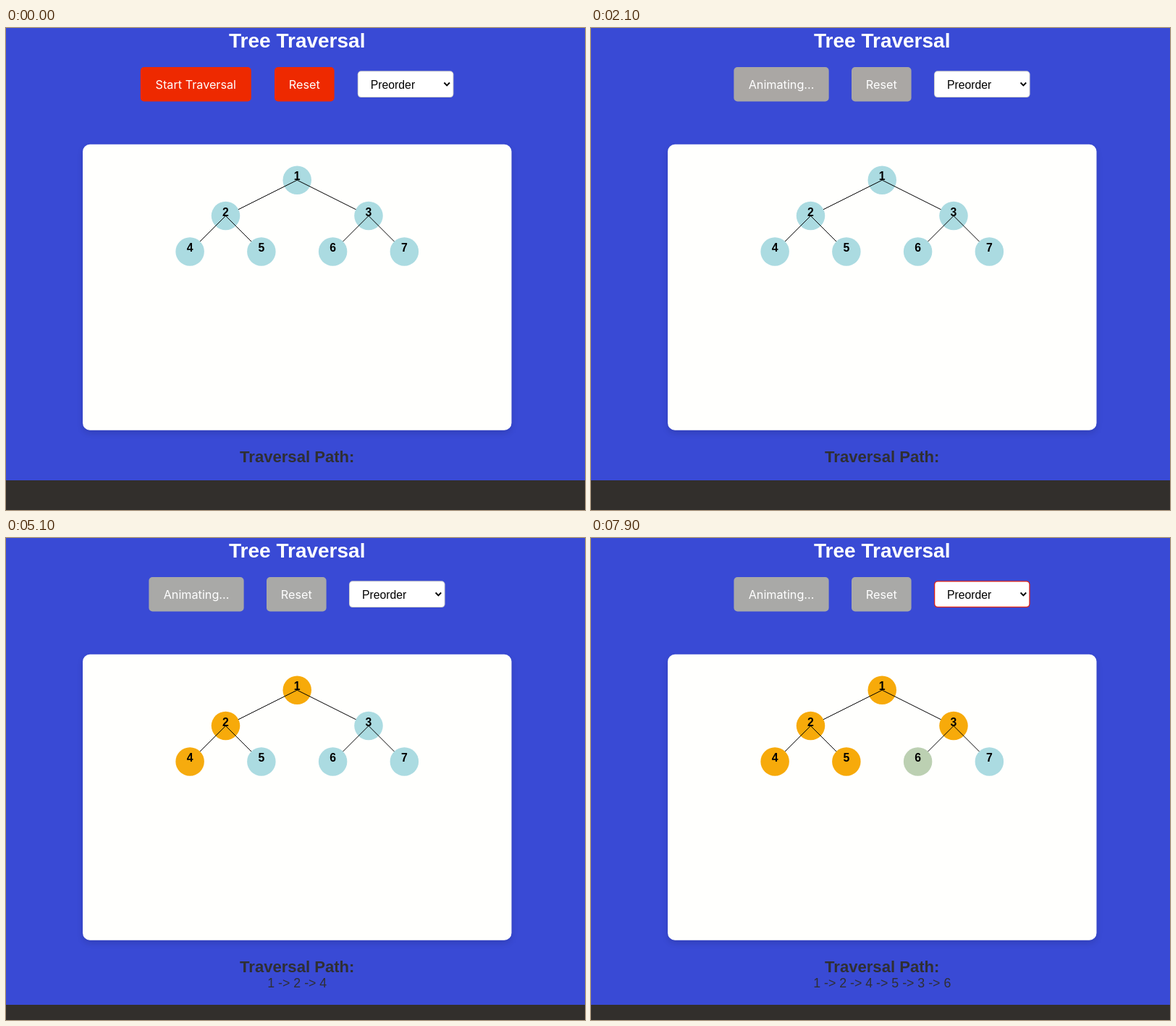
An HTML page with a canvas for the animation above (8 s loop, 800x666 px).

```html
<!DOCTYPE html>
<html lang="en">
<head>
<meta charset="utf-8">
<title>Tree Traversal</title>
<style>
  html, body { margin: 0; width: 100%; height: 100%; overflow: hidden; background: #394ad5; }
  canvas { display: block; }
</style>
</head>
<body>
<canvas id="stage" width="800" height="666"></canvas>
<script>
const ctx = document.getElementById('stage').getContext('2d');
const LOOP = 8000, STEP = 100;
const UNIT = 0.9875, CENTER = 402.25, PANEL_TOP = 160.8;
const SANS = '"Liberation Sans", Arial, sans-serif';
const BUTTON_FONT = '16.2px Inter, sans-serif';

const BLUE = [57, 74, 213], RED = [238, 41, 0], DARK_RED = [224, 36, 12];
const GRAY = [169, 169, 167], PALE = [171, 219, 225], ORANGE = [247, 170, 10];
const BORDER = [204, 204, 204], FOCUS = [222, 36, 22];

const HOVER_AT = 1350, CLICK_AT = 1850, VISIT_AT = 2850, SELECT_HOVER_AT = 6750;
const ORDER = [1, 2, 4, 5, 3, 6];

const rgb = c => `rgb(${c.map(Math.round).join()})`;
const mix = (a, b, k) => a.map((v, i) => v + (b[i] - v) * k);

// CSS "ease": cubic-bezier(.25, .1, .25, 1), solved by bisection
function ease(x) {
  if (x <= 0) return 0;
  if (x >= 1) return 1;
  const bez = (p1, p2, s) => 3 * p1 * s * (1 - s) ** 2 + 3 * p2 * s * s * (1 - s) + s ** 3;
  let lo = 0, hi = 1;
  for (let i = 0; i < 24; i++) {
    const mid = (lo + hi) / 2;
    if (bez(0.25, 0.25, mid) < x) lo = mid; else hi = mid;
  }
  return bez(0.1, 1, lo);
}
const transition = (t, start) => ease((t - start) / 300);

function text(str, x, y, font, color, align = 'center') {
  ctx.font = font;
  ctx.fillStyle = color;
  ctx.textAlign = align;
  ctx.fillText(str, x, y);
}

function roundRect(x, y, w, h, r, color) {
  ctx.beginPath();
  ctx.roundRect(x, y, w, h, r);
  ctx.fillStyle = color;
  ctx.fill();
}

function button(label, x, w, color, scale = 1) {
  const h = 47.4;
  ctx.save();
  ctx.translate(x + w / 2, 77.7);
  ctx.scale(scale, scale);
  roundRect(-w / 2, -h / 2, w, h, 5, rgb(color));
  text(label, 0, 5.9, BUTTON_FONT, '#fff');
  ctx.restore();
}

function select(x, hover) {
  roundRect(x, 59.3, 132.6, 36.8, 5, rgb(mix(BORDER, FOCUS, hover)));
  const edge = 1 + 0.3 * hover;
  roundRect(x + edge, 59.3 + edge, 132.6 - 2 * edge, 36.8 - 2 * edge, 4, '#fff');
  text('Preorder', x + 17.9, 83.6, `15.8px ${SANS}`, '#000', 'left');
  ctx.beginPath();
  ctx.moveTo(x + 119.6, 75.5);
  ctx.lineTo(x + 123.4, 79.3);
  ctx.lineTo(x + 127.2, 75.5);
  ctx.lineWidth = 1.9;
  ctx.strokeStyle = '#000';
  ctx.stroke();
}

function controls(t) {
  const running = t >= CLICK_AT;
  const hover = transition(t, HOVER_AT), off = transition(t, CLICK_AT);
  const scale = 1 + 0.05 * (running ? 1 - off : hover);
  const startColor = running ? mix(DARK_RED, GRAY, off) : mix(RED, DARK_RED, hover);
  if (running) button('Animating...', 197.4, 131.2, startColor, scale);
  else button('Start Traversal', 185.8, 153, startColor, scale);
  button('Reset', running ? 360 : 371, 82.6, mix(RED, GRAY, off));
  select(running ? 474 : 485.8, transition(t, SELECT_HOVER_AT));
}

function visitProgress(id, t) {
  const i = ORDER.indexOf(id);
  return i < 0 ? 0 : transition(t, VISIT_AT + i * 1000);
}

function node(id, x, y, spread, t) {
  ctx.beginPath();
  ctx.arc(x, y, 20 * UNIT, 0, Math.PI * 2);
  ctx.fillStyle = rgb(mix(PALE, ORANGE, visitProgress(id, t)));
  ctx.fill();
  text(id, x, y, `bold 15.8px ${SANS}`, '#000');
  if (id > 3) return;
  const childY = y + 50 * UNIT;
  for (const side of [0, 1]) {
    const childX = x + (side ? spread : -spread);
    ctx.beginPath();
    ctx.moveTo(x, y);
    ctx.lineTo(childX, childY);
    ctx.lineWidth = 1;
    ctx.strokeStyle = '#000';
    ctx.stroke();
    node(id * 2 + side, childX, childY, spread / 2, t);
  }
}

function panel() {
  ctx.save();
  ctx.shadowColor = 'rgba(0,0,0,.13)';
  ctx.shadowBlur = 8;
  ctx.shadowOffsetY = 4;
  roundRect(CENTER - 300 * UNIT, PANEL_TOP, 600 * UNIT, 400 * UNIT, 10, '#fffffd');
  ctx.restore();
}

function draw(t) {
  ctx.fillStyle = rgb(BLUE);
  ctx.fillRect(0, 0, 800, 666);
  text('Tree Traversal', CENTER, 27, `bold 28px ${SANS}`, '#fff');
  controls(t);
  panel();
  node(1, CENTER, PANEL_TOP + 50 * UNIT, 100 * UNIT, t);

  const visited = ORDER.filter((_, i) => t >= VISIT_AT + i * 1000);
  text('Traversal Path:', CENTER, 599.6, `bold 22.1px ${SANS}`, '#2f2f33');
  text(visited.join(' -> '), CENTER, 621.3, `17.78px ${SANS}`, '#2f2f33');
  const floor = visited.length ? 645 : 625;
  ctx.fillStyle = '#322f2c';
  ctx.fillRect(0, floor, 800, 666 - floor);
}

const origin = performance.now();
function tick() {
  const t = (performance.now() - origin) % LOOP;
  draw(Math.floor(t / STEP) * STEP);
  requestAnimationFrame(tick);
}
tick();
</script>
</body>
</html>
```
